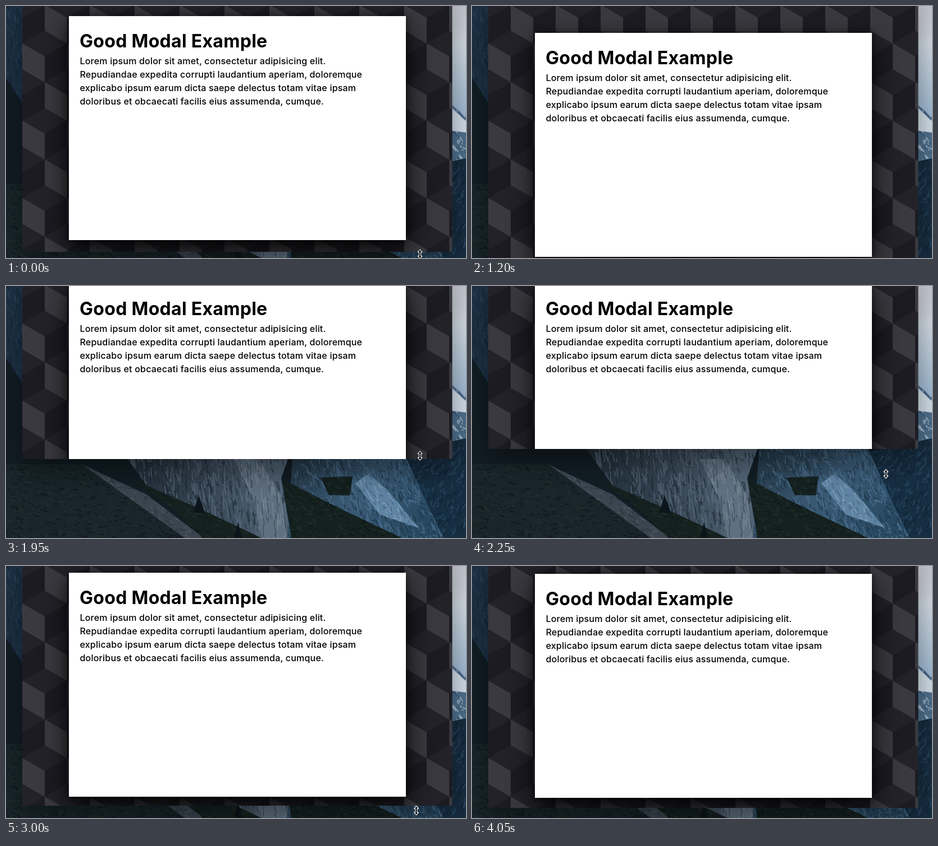
Write an HTML page that moves like this. It is 819 by 450 pixels and loops after 4150 ms.

```html
<!DOCTYPE html>
<html lang="en">
<head>
<meta charset="utf-8">
<title>Good Modal Example</title>
<style>
  html, body { margin: 0; width: 100%; height: 100%; overflow: hidden; background: #101a22; }
  svg { display: block; width: 819px; height: 450px; }
  text { font-family: Inter, "Open Sans", sans-serif; fill: #000; }
  .title { font-size: 32px; font-weight: 700; letter-spacing: .3px; }
  .body { font-size: 16px; font-weight: 500; letter-spacing: .2px; }
</style>
</head>
<body>
<svg viewBox="0 0 819 450" xmlns="http://www.w3.org/2000/svg">
  <defs>
    <linearGradient id="sky" x1="0" y1="0" x2="0" y2="1">
      <stop offset="0" stop-color="#c3c4cc"/>
      <stop offset=".3" stop-color="#d5dde6"/>
      <stop offset="1" stop-color="#94b4cf"/>
    </linearGradient>
    <linearGradient id="rock" x1="0" y1="0" x2="1" y2="0">
      <stop offset="0" stop-color="#1f2c36"/>
      <stop offset=".5" stop-color="#364553"/>
      <stop offset="1" stop-color="#546678"/>
    </linearGradient>
    <linearGradient id="slope" x1="0" y1="0" x2="1" y2=".6">
      <stop offset="0" stop-color="#223440"/>
      <stop offset=".6" stop-color="#3a5a75"/>
      <stop offset="1" stop-color="#284961"/>
    </linearGradient>
    <filter id="soft" filterUnits="userSpaceOnUse" x="-150" y="-200" width="1150" height="950">
      <feGaussianBlur stdDeviation="25"/>
    </filter>
    <filter id="tight" filterUnits="userSpaceOnUse" x="0" y="-200" width="819" height="850">
      <feGaussianBlur stdDeviation="7"/>
    </filter>
    <pattern id="cubes" x="29" y="67" width="80" height="138" patternUnits="userSpaceOnUse">
      <rect width="80" height="138" fill="#232229"/>
      <g id="tiles"></g>
    </pattern>
    <clipPath id="frame"><rect class="win" x="29" y="-20" width="765.5" rx="4"/></clipPath>
  </defs>

  <g id="scenery"></g>
  <rect class="win" x="29" y="2" width="765.5" opacity=".4" filter="url(#soft)"/>

  <g clip-path="url(#frame)">
    <rect x="29" y="-20" width="766" height="700" fill="url(#cubes)"/>
    <g id="modal">
      <rect x="112" y="20" width="600" height="400" opacity=".85" filter="url(#soft)"/>
      <rect x="112" y="2" width="600" height="400" opacity=".6" filter="url(#tight)"/>
      <rect x="112" width="600" height="400" fill="#fff"/>
      <text class="title" x="131" y="56">Good Modal Example</text>
      <g class="body" id="copy"></g>
    </g>
  </g>

  <g fill="#0a0a0c" stroke="#fff" stroke-width="1.1" stroke-linejoin="round">
    <path id="resize" d="M0-8 4-3.5H1.6V3.5H4L0 8-4 3.5H-1.6V-3.5H-4Z"/>
    <path id="arrow" d="M.5.5V14L3.7 11 5.8 16 8 15 5.9 10.2H10Z"/>
  </g>
</svg>
<script>
const $ = id => document.getElementById(id);

function add(parent, tag, attrs, text) {
  const el = document.createElementNS('http://www.w3.org/2000/svg', tag);
  for (const key in attrs) el.setAttribute(key, attrs[key]);
  if (text) el.textContent = text;
  parent.append(el);
  return el;
}

let seed = 7;
const random = () => (seed = seed * 16807 % 2147483647) / 2147483647;

// A flat area, optionally roughened with short strokes running along (dx, dy)
function shape(fill, points, tones = [], dx = 0, dy = 0) {
  const box = add($('scenery'), 'polygon', { fill, points }).getBBox();
  if (!tones.length) return;
  const id = 'area' + $('scenery').childElementCount;
  add(add($('scenery'), 'clipPath', { id }), 'polygon', { points });
  const group = add($('scenery'), 'g', { 'clip-path': `url(#${id})`, opacity: .6 });
  for (const stroke of tones) {
    let d = '';
    for (let n = box.width * box.height / 130; n > 0; n--) {
      const x = box.x + random() * box.width, y = box.y + random() * box.height;
      d += `M${x.toFixed(1)} ${y.toFixed(1)}l${(dx * random()).toFixed(1)} ${(dy * random()).toFixed(1)}`;
    }
    add(group, 'path', { d, stroke, 'stroke-width': 2, 'stroke-linecap': 'round' });
  }
}

// Mountain valley: sky, peaks, woods and cliffs
const WOODS = ['#0c1518', '#25352f'];
shape('#121d24', '0,0 819,0 819,450 0,450');
shape('#1d3144', '0,0 40,0 40,190 0,128', ['#14222e', '#2c455c'], 3, 14);
shape('url(#sky)', '780,0 819,0 819,220 780,220');
shape('#4f718e', '780,165 819,198 819,300 780,300', ['#dbe5ee', '#38587a'], 9, 12);
shape('#d3dfe9', '788,176 819,206 819,226 788,222');
shape('#172e42', '690,300 819,272 819,450 780,450', ['#10202e', '#2d506d'], -8, 10);
shape('#18252a', '0,318 140,318 310,440 300,450 0,450', WOODS, 8, 3);
shape('url(#rock)', '195,280 512,280 490,343 508,450 405,450 255,362', ['#1d2934', '#5f7081'], 4, 22);
shape('#5f7080', '405,309 450,309 489,372 500,450 452,450 446,390', ['#3a4957', '#7f8d9b'], 3, 24);
shape('#3a454f', '138,320 250,372 352,450 318,450 235,390', ['#273139', '#56616b'], 8, 5);
shape('#15211f', '225,345 350,400 455,450 350,450 300,400', WOODS, 8, 3);
shape('url(#slope)', '512,280 700,280 755,400 780,450 500,450', ['#1c303f', '#54789a'], 8, 14);
shape('#5f83a2', '622,352 645,335 680,365 735,432 665,408', ['#3b5c78', '#8ba9c2'], 7, 12);
shape('#14211f', '492,345 590,395 705,450 508,450', WOODS, 8, 4);
shape('#14211f', '560,342 617,340 612,374 575,373', WOODS, 8, 4);
shape('#0c151a', '343,374 354,405 333,405');
shape('#0c151a', '413,422 420,450 406,450');

// Isometric cubes, repeated across tile edges
for (const [x, y] of [[0, 0], [-40, 69], [40, 69], [-40, -69], [40, -69]]) {
  add($('tiles'), 'path', { fill: '#3a393f', d: `M${x} ${y}l40 23v46l-40-23z` });
  add($('tiles'), 'path', { fill: '#1c1b22', d: `M${x + 40} ${y + 23}l40-23v46l-40 23z` });
}

[
  'Lorem ipsum dolor sit amet, consectetur adipisicing elit.',
  'Repudiandae expedita corrupti laudantium aperiam, doloremque',
  'explicabo ipsum earum dicta saepe delectus totam vitae ipsam',
  'doloribus et obcaecati facilis eius assumenda, cumque.'
].forEach((line, i) => add($('copy'), 'text', { x: 131.5, y: 86 + 24 * i }, line));

const LOOP = 4150, STEP = 150, RELEASE = 3450;

// Key points: [time, value, ease-out power of the move that ends here]
const EDGE = [[600, 439], [1050, 549, 2], [1500, 403, 1], [1950, 309, 2], [2250, 291, 2], [3150, 432, 2]];
const POINTER_X = [[2250, 737], [2550, 733, 1], [RELEASE, 728, 1], [3750, 750, 1]];
const POINTER_Y = [[550, 443], [1050, 565, 2], [1500, 376, 1], [1950, 303, 2], [2100, 296, 1],
  [3100, 438, 2], [RELEASE, 431, 1], [3750, 459, 1]];

function follow(keys, time) {
  const next = keys.findIndex(key => time < key[0]);
  if (next < 0) return keys[keys.length - 1][1];
  if (next === 0) return keys[0][1];
  const [t0, from] = keys[next - 1], [t1, to, power] = keys[next];
  const rest = ((t1 - time) / (t1 - t0)) ** power;
  return to + (from - to) * rest;
}

const windows = document.querySelectorAll('.win');

function draw(elapsed) {
  const time = Math.floor((elapsed % LOOP) / STEP) * STEP;
  const edge = Math.round(follow(EDGE, time));
  const top = Math.max(-4, Math.round(edge / 2) - 202);
  for (const rect of windows) rect.setAttribute('height', edge + 20);
  $('modal').setAttribute('transform', `translate(0 ${top})`);

  const spot = `translate(${follow(POINTER_X, time)} ${follow(POINTER_Y, time)})`;
  const released = time >= RELEASE;
  for (const id of ['resize', 'arrow']) {
    $(id).setAttribute('transform', spot);
    $(id).setAttribute('visibility', (id === 'arrow') === released ? 'visible' : 'hidden');
  }
}

const start = performance.now();
function tick() {
  draw(performance.now() - start);
  requestAnimationFrame(tick);
}
tick();
</script>
</body>
</html>
```
